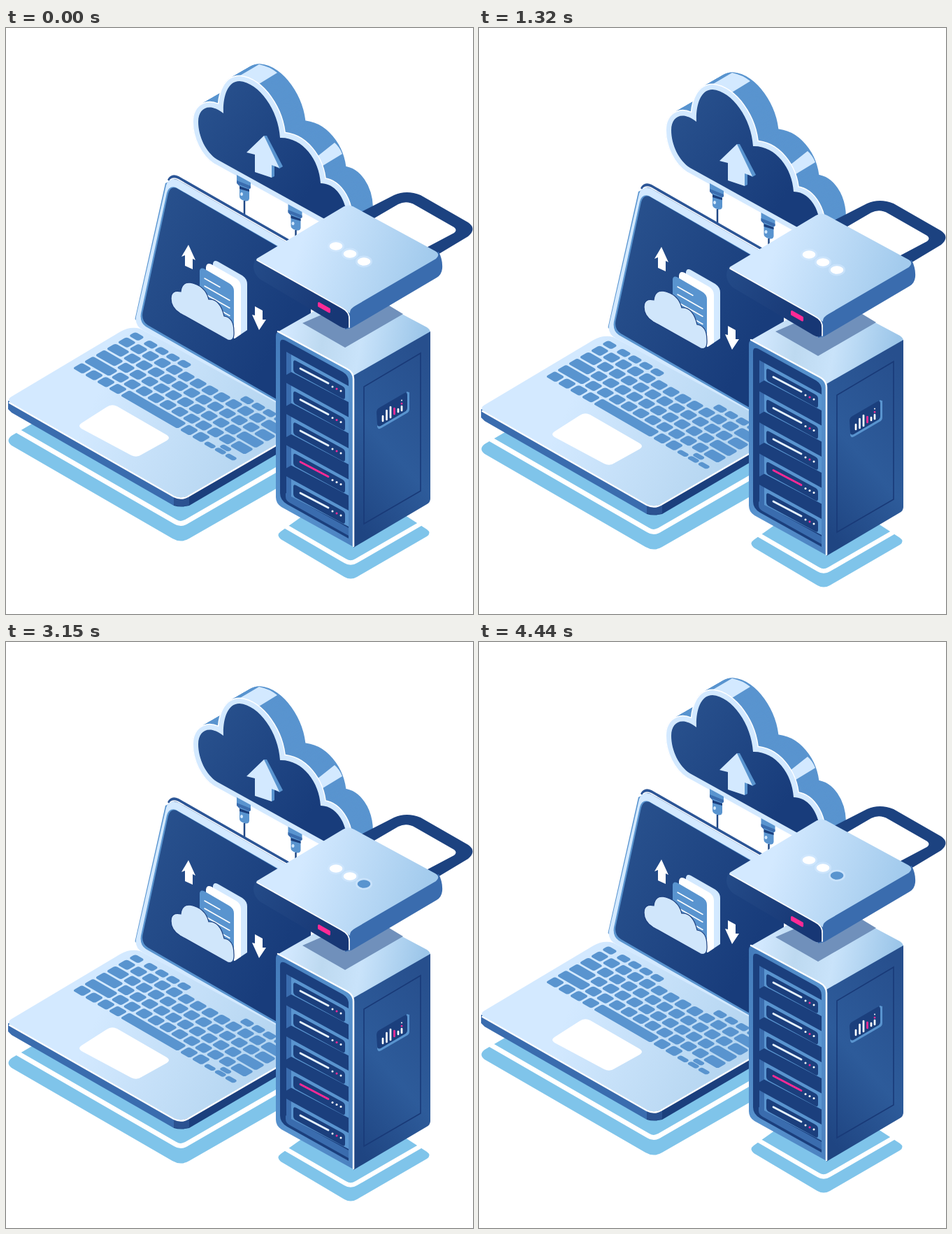
These frames come from a looping animation (668 px wide and 838 px high, 4.5 s). An HTML page:

```html
<!DOCTYPE html>
<html lang="en">
<head>
<meta charset="utf-8">
<title>Cloud backup</title>
<style>
html, body { margin: 0; height: 100%; overflow: hidden; background: #fff; }
svg { display: block; width: 100vw; height: 100vh; }
.light { fill: #d3e9ff; }
.sky { fill: #7fc4ea; }
.mid { fill: #5994cf; }
.blue { fill: #3a6cae; }
.dark { fill: #1b3f7d; }
.white { fill: #fff; }
.pink { fill: #ff2a95; }
.line { fill: none; stroke: #fff; stroke-linecap: round; stroke-linejoin: round; }
</style>
</head>
<body>
<svg viewBox="0 0 668 838">
  <defs>
    <linearGradient id="navy" x2="1" y2=".7"><stop stop-color="#2a538f"/><stop offset=".85" stop-color="#183c7b"/></linearGradient>
    <linearGradient id="ice" x2="1" y2=".2"><stop offset=".3" stop-color="#d3e9ff"/><stop offset="1" stop-color="#a3cbed"/></linearGradient>
    <linearGradient id="deck" x2="1" y2=".3"><stop offset=".4" stop-color="#d3e9ff"/><stop offset="1" stop-color="#b6d6f1"/></linearGradient>
    <linearGradient id="roof" x2="1" y2=".1"><stop offset=".1" stop-color="#d3e9ff"/><stop offset=".35" stop-color="#bdd9f0"/><stop offset=".6" stop-color="#c9e3fa"/><stop offset="1" stop-color="#9cc6e9"/></linearGradient>
    <linearGradient id="side" x1=".7" y1="0" x2=".3" y2="1"><stop stop-color="#274f8d"/><stop offset=".55" stop-color="#2d5b9a"/><stop offset="1" stop-color="#1f4582"/></linearGradient>
    <linearGradient id="frame" x2="1" y2="1"><stop stop-color="#437bbb"/><stop offset=".5" stop-color="#5994cf"/><stop offset="1" stop-color="#4a80bf"/></linearGradient>
    <linearGradient id="front" x2="1" y2=".4"><stop stop-color="#244b88"/><stop offset="1" stop-color="#173775"/></linearGradient>
    <path id="cloud" d="M311 122C310 100 316 76 334 76C362 78 390 118 392 157C424 156 448 188 450 222C472 222 488 246 488 276V291L302 188C286 178 275 155 275 134C275 114 291 106 311 122Z"/>
    <g id="plug">
      <path class="mid" d="M330 210L350 221V229L346 231L334 226L330 221Z"/>
      <path class="blue" d="M330 218L350 226V229L346 231L334 226L330 222Z"/>
      <path class="mid" d="M334 224L348 230V244Q347 249 341 247Q334 245 334 241Z"/>
      <path class="dark" d="M334 226L348 231V234L334 230Z"/>
      <ellipse class="light" cx="337" cy="237.500" rx="2" ry="2.500"/>
      <path d="M341 247V275" stroke="#214885" stroke-width="2.500"/>
    </g>
  </defs>

  <g id="scene">
    <!-- cloud -->
    <g id="sweep" class="mid" stroke="#5994cf" stroke-width="16" stroke-linejoin="round"></g>
    <path class="light" d="M333 69L362 52Q377 55 388 64L357 83ZM441 187L470 164Q477 170 481 180L453 197Z"/>
    <use href="#cloud" fill="#fff" stroke="#fff" stroke-width="17" stroke-linejoin="round"/>
    <use href="#cloud" class="light" stroke="#d3e9ff" stroke-width="14" stroke-linejoin="round"/>
    <use href="#cloud" fill="url(#navy)"/>
    <g id="lift">
      <path class="mid" d="M369 154L373 154L396 198L391 201L384 197V212L380 214Z"/>
      <path class="light" d="M369 154L391 200L380 196V214L356 206V181L344 178Z"/>
    </g>
    <use href="#plug"/>
    <use href="#plug" x="73.500" y="42"/>

    <!-- laptop -->
    <path class="sky" d="M44 562L8 583Q-1 590 8 597L238 730Q250 737 262 730L400 651V560Z"/>
    <path class="line" stroke-width="7" stroke-linecap="butt" d="M13 574L242 706Q250 711 258 706L400 624"/>
    <path class="blue" d="M3 533V545L8 550L240 683L250 600Z"/>
    <path class="dark" d="M240 672V683Q250 686 262 683L400 602V580Z"/>
    <path fill="#2b5291" d="M240 670V682Q250 686 262 682V670Z"/>
    <path fill="url(#deck)" d="M8 527L164 434Q178 426 192 430L400 540V589L260 669Q250 674 240 669L8 537Q0 532 8 527Z"/>
    <path class="line" stroke-width="2.500" d="M5 536L240 670Q250 675 260 670L400 589"/>
    <path fill="#2b5596" d="M231 217Q236 207 247 212L436 320V330L240 225Z"/>
    <path class="mid" d="M184.500 416L228 222L236 218L192 426Z"/>
    <path class="light" d="M186 413L229 225Q233 212 247 218L436 326V563L196 432Q184 426 186 413Z"/>
    <path class="line" stroke-width="1.500" d="M235 217Q240 213 247 217L436 325"/>
    <path class="mid" d="M193 408L230 236Q233 225 243 228L436 339V562L200 427Q191 421 193 408Z"/>
    <path fill="url(#navy)" d="M195.500 407L232 237Q235 226 244 229L436 340V559L203 425Q193.500 419 195.500 407Z"/>
    <g id="keys" class="mid" transform="matrix(1 .577 -1 .577 186 434)"></g>
    <path class="white" d="M108 565L144 542Q151 537 159 541L230 582Q236 586 230 590L194 610Q187 615 179 611L108 573Q102 569 108 565Z"/>

    <!-- documents on the screen -->
    <path class="light" d="M296 337Q297 331 303 334L338 354Q345 359 345 366V432L327 444L296 420Z"/>
    <path class="white" d="M286 342Q287 335 294 338L329 358Q336 362 336 370V438L327 444L286 420Z"/>
    <path class="mid" d="M277 347Q278 342 283 344L319 365Q326 369 326 376V444L277 415Z"/>
    <g id="rules" class="line" stroke-width="1.500"></g>
    <path fill="#d0e6fb" stroke="#1c3f7e" stroke-width="1.200" d="M236 387Q236 374 250 377Q251 364 263 364Q285 368 290 388Q306 387 312 412Q326 414 326 434Q327 449 317 446L249 408Q236 400 236 387Z"/>
    <path id="up" class="white" d="M261 310L271 332L267 330V345L256 340V325L251 327Z"/>
    <path id="down" class="white" d="M356 398L367 404V417L372 417L362 432L352 410L356 411Z"/>

    <!-- server -->
    <path class="sky" d="M424 698L393 720Q386 725 393 731L484 785Q493 790 502 785L602 727Q609 722 602 717L565 693Z"/>
    <path class="line" stroke-width="6.500" stroke-linecap="butt" d="M397 711L485 762Q493 767 501 762L598 706"/>
    <path fill="url(#roof)" d="M388 435L488 378Q498 372 508 378L602 428Q607 431 607 436L497 498Z"/>
    <path fill="#7090bb" d="M424 422L485 457L568 409L520 380Z"/>
    <path fill="url(#side)" d="M497 497L607 434V673Q607 678 602 681L497 743Z"/>
    <path fill="none" stroke="#193a78" stroke-width="1.600" d="M512 513L593 465V662L512 709Z"/>
    <path fill="url(#frame)" d="M386 441Q386 432 394 436L488 487Q497 492 497 501V742L394 685Q386 680 386 671Z"/>
    <path class="line" stroke-width="2.500" d="M389 434L487 487Q497 492 497 502V741"/>
    <path class="dark" d="M392 451Q392 443 400 447L482 492Q490 497 490 505V730L402 681Q392 675 392 665Z"/>
    <path class="blue" d="M400 665L490 715V726L406 679Q400 676 400 670Z"/>
    <g id="units"></g>
    <path class="mid" d="M533 549L573 526V520L577 521V545Q577 549 573 551L537 572Q532 575 531 570Z"/>
    <path class="dark" d="M530 550Q530 545 534 543L570 522Q574 520 574 525V543Q574 547 570 549L536 569Q531 571 531 566Z"/>
    <path class="line" stroke-width="2.700" d="M539 555V562M544.500 547V560M550 542V557M561 545V549M566 541V547"/>
    <path class="line" style="stroke:#ff2a95" stroke-width="2.700" d="M555.500 544V552M566 537V537.200"/>
    <circle class="white" cx="566" cy="532.500" r="1"/>

    <!-- padlock -->
    <path fill="#1c4280" fill-rule="evenodd" d="M508 263L555 239Q573 231 593 239L661 278Q674 287 661 298L606 331L590 320L641 293Q646 289 641 285L585 253Q573 246 561 252L525 273Z"/>
    <path class="blue" d="M485 402L600 326L619 320Q625 332 624 344Q623 353 616 357L494 429L485 431Z"/>
    <path fill="url(#front)" d="M357 330Q349 346 363 359L478 427Q489 433 491 425V412Q489 404 480 400Z"/>
    <path fill="url(#ice)" d="M360 329L482 256Q490 251 498 256L614 319Q622 324 615 330L500 397Q491 402 492 408L480 400L362 334Q356 331 360 329Z"/>
    <path class="line" stroke-width="1.700" d="M359 332L480 400Q492 406 491 417V428"/>
    <path class="pink" stroke="#ff2a95" stroke-width="3" stroke-linejoin="round" d="M447.500 393.500L462.500 402V406L447.500 397.500Z"/>
    <g id="dots"></g>
  </g>
</svg>
<script>
const LOOP = 4500;
const $ = id => document.getElementById(id);
const fill = (id, n, part) => $(id).innerHTML = Array.from({ length: n }, (_, i) => part(i)).join('');
const shift = (id, y) => $(id).setAttribute('transform', `translate(0 ${Math.round(y)})`);

fill('sweep', 30, i => `<use href="#cloud" x="${29 - i}" y="${(i - 29) * .577}"/>`);
fill('rules', 5, i => `<path d="M284 ${358 + i * 11}l${i ? 36 : 22} ${i ? 20.5 : 12.5}"/>`);
fill('units', 5, i => `<g transform="translate(0 ${i * 44.5})">
  <path class="blue" d="M401 463L408 467V492L401 496Z"/>
  <path class="mid" d="M408 467L490 512V535L408 492Z"/>
  <path class="dark" d="M411 478Q411 474 415 476L481 512Q485 514 485 518V528Q485 532 481 530L415 494Q411 492 411 488Z"/>
  <path class="line" style="stroke:${i == 3 ? '#ff2a95' : '#e6f3ff'}" stroke-width="2.800" d="M421 487L461 508"/>
  <circle class="white" cx="467" cy="513" r="1.500"/>
  <circle class="${i == 3 ? 'white' : 'pink'}" cx="473" cy="516" r="1.500"/>
  <circle class="white" cx="479" cy="519" r="1.500"/></g>`);
fill('dots', 3, i => `<g transform="translate(${472 + i * 20} ${312 + i * 11})">
  <ellipse class="light" opacity=".6" rx="12" ry="8.500"/><ellipse class="dot" rx="9.300" ry="5.700"/></g>`);

// Keyboard, laid out flat and tilted by its group
const KEY = 14.3, GAP = 2.7, ROW = 16, COLS = 230;
const keys = [];
const key = (x, y, w, h = 13.3) =>
  keys.push(`<rect x="${x}" y="${y}" width="${w}" height="${h}" rx="3"/>`);
const rowTop = row => 13.5 + row * ROW;
for (const x of [0, 20, 36, 52, 68, 158, 174, 190, 206]) key(x, 1, 13.3, 9.5);
[14, 21, 28, 36].forEach((first, row) => {
  key(0, rowTop(row), first);
  let x = first + GAP;
  for (; x < COLS - 34; x += KEY + GAP) key(x, rowTop(row), KEY);
  key(x, rowTop(row), COLS - x);
});
const last = rowTop(4);
for (let i = 0; i < 4; i++) key(i * 17, last, KEY);
key(68, last, 82);
for (const x of [153, 170]) key(x, last, KEY);
for (const x of [187, 202, 217]) key(x, last + 7, 13, 6.5);
key(202, last - .5, 13, 6.5);
$('keys').innerHTML = keys.join('');

// Linear interpolation through [time, value] stops
function track(stops, t) {
  const i = stops.findIndex(s => s[0] > t);
  const [t0, a] = stops[i - 1], [t1, b] = stops[i];
  return a + (b - a) * (t - t0) / (t1 - t0);
}
const bob = [[0, 0], [2270, 20], [4470, 0], [LOOP, 0]];
const rise = [[0, 0], [480, -1], [1320, -9], [1980, -17], [2290, -19], [2610, -17], [3690, -3], [4440, 1], [LOOP, 1]];
const drift = [[0, 0], [1320, 0], [1980, -1], [2610, 0], [3690, 3], [4440, 4.5], [LOOP, 4.5]];
const dots = document.querySelectorAll('.dot');
const start = performance.now();

function draw() {
  const t = (performance.now() - start) % LOOP;
  shift('scene', track(bob, t));
  shift('up', track(rise, t));
  shift('lift', track(drift, t));
  shift('down', 9.2 + 10 * Math.cos((t - 1950) / LOOP * 2 * Math.PI));
  const lit = t < 1500 ? -1 : Math.min(2, Math.floor((t - 1500) / 750));
  dots.forEach((dot, i) => dot.setAttribute('fill', i == lit ? '#5994cf' : '#fff'));
  requestAnimationFrame(draw);
}
draw();
</script>
</body>
</html>
```
